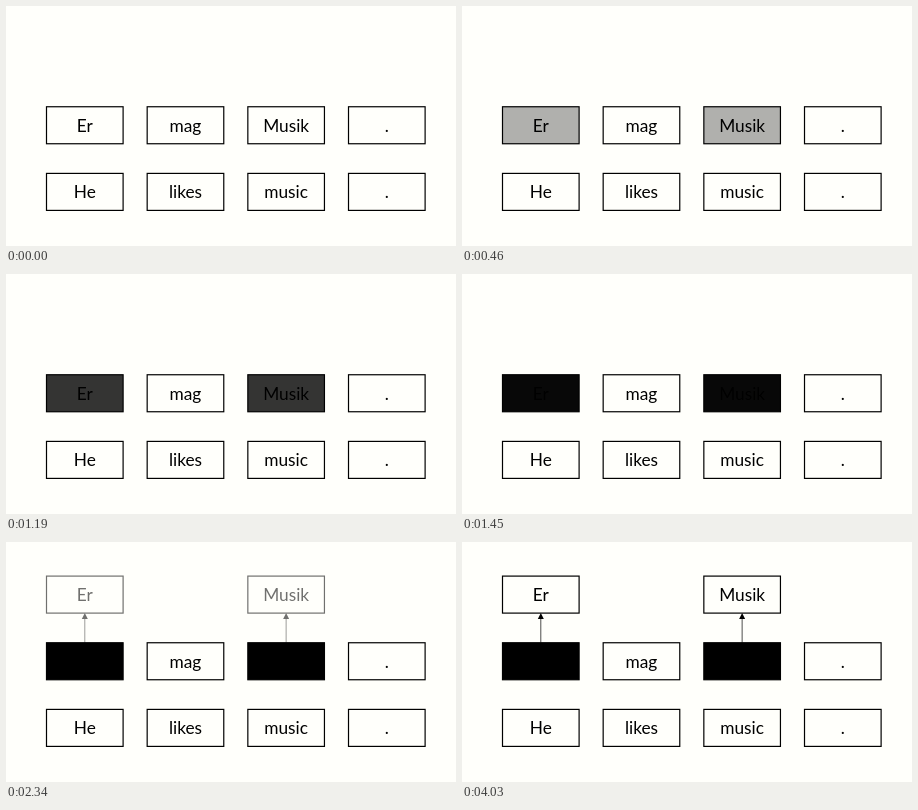
Write an HTML page that moves like this. It is 450 by 240 pixels and loops after 5010 ms.

```html
<!DOCTYPE html>
<html lang="en">
<head>
<meta charset="utf-8">
<title>Word masking</title>
<style>
  html, body { margin: 0; width: 100%; height: 100%; overflow: hidden; background: #fffffb; }
  svg { display: block; width: 450px; height: 240px; }
  .box { fill: none; stroke: #000; stroke-width: 1.2; }
  .line { stroke: #000; stroke-width: 0.7; }
  text { font: 17.3px Lato, "Open Sans", sans-serif; text-anchor: middle; }
  .mask, .lifted { opacity: 0; }
</style>
</head>
<body>
<svg id="stage" viewBox="0 0 450 240"></svg>
<script>
const LOOP = 5010;
const W = 76.6, H = 37;
const stage = document.getElementById('stage');
const colX = i => 40.5 + i * 100.67;
const rowY = i => 34.1 + i * 66.65;

function add(parent, tag, attrs, content) {
  const el = document.createElementNS('http://www.w3.org/2000/svg', tag);
  for (const key in attrs) el.setAttribute(key, attrs[key]);
  if (content) el.textContent = content;
  parent.append(el);
  return el;
}

function card(parent, col, row, word) {
  const x = colX(col), y = rowY(row);
  add(parent, 'rect', { class: 'box', x, y, width: W, height: H });
  add(parent, 'text', { x: x + W / 2, y: y + 24.8 }, word);
}

function arrow(parent, col) {
  const x = colX(col) + W / 2, tip = rowY(0) + H;
  add(parent, 'path', { class: 'line', d: `M${x} ${rowY(1)}V${tip + 5}` });
  add(parent, 'path', { d: `M${x} ${tip}l3 6h-6z` });
}

function fadeIn(el, start, end) {
  el.animate([
    { opacity: 0, offset: 0 },
    { opacity: 0, offset: start / LOOP },
    { opacity: 1, offset: end / LOOP },
    { opacity: 1, offset: 1 }
  ], { duration: LOOP, iterations: Infinity });
}

const german = ['Er', 'mag', 'Musik', '.'];
const english = ['He', 'likes', 'music', '.'];
german.forEach((word, i) => card(stage, i, 1, word));
english.forEach((word, i) => card(stage, i, 2, word));

const masks = add(stage, 'g', { class: 'mask' });
const lifted = add(stage, 'g', { class: 'lifted' });
for (const col of [0, 2]) {
  add(masks, 'rect', { x: colX(col), y: rowY(1), width: W, height: H });
  card(lifted, col, 0, german[col]);
  arrow(lifted, col);
}

fadeIn(masks, 0, 1500);
fadeIn(lifted, 1500, 3000);
</script>
</body>
</html>
```
